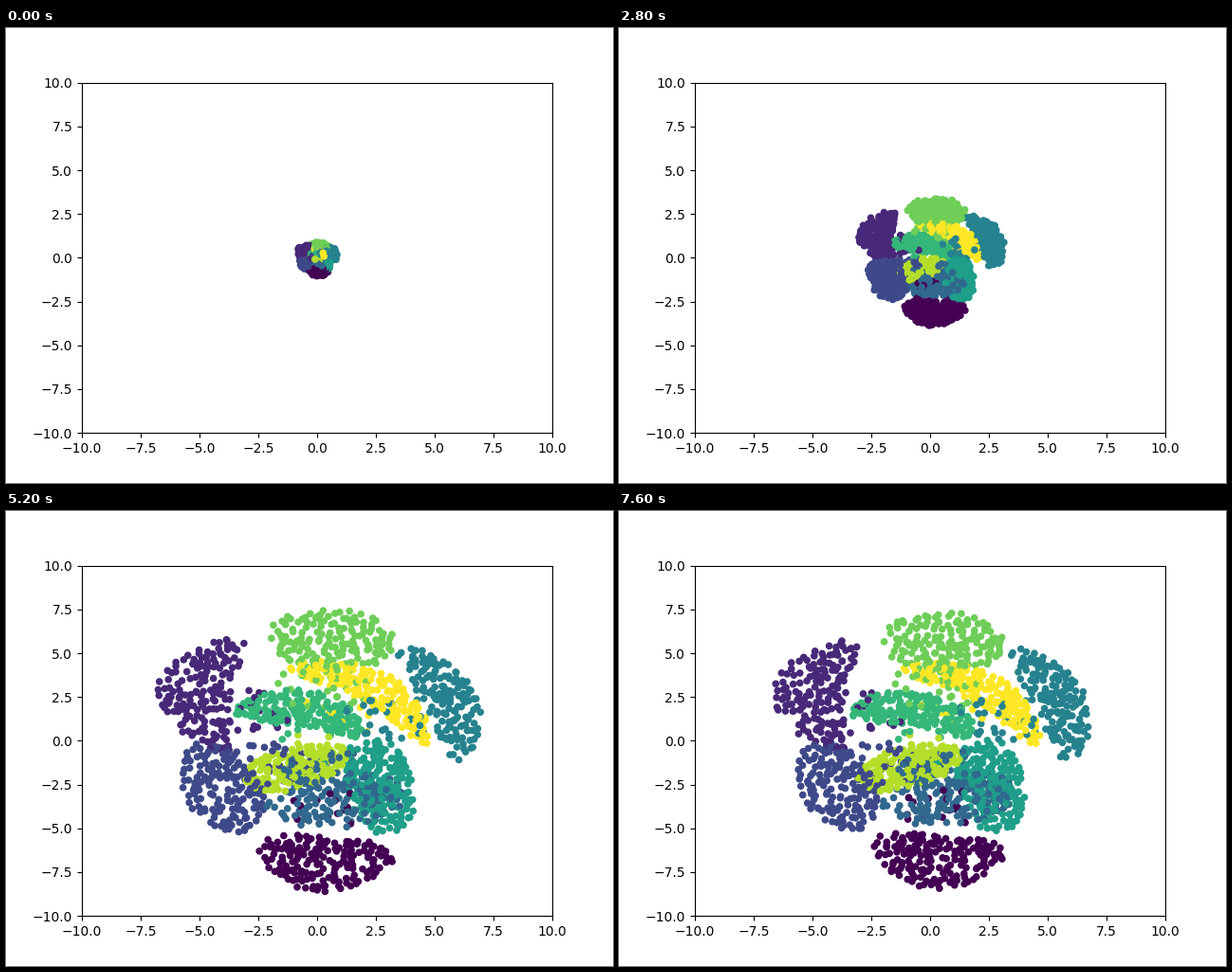
A matplotlib script that plays this animation: 640x480 px, repeating every 8 s.

```python
import numpy as np
import matplotlib.pyplot as plt
from matplotlib.animation import FuncAnimation

FRAMES, INTERVAL = 20, 400
CLASS_SIZE = 180
rng = np.random.default_rng(7)


def disc(count, tries=1):
    """Points in the unit disc; more tries space them more evenly."""
    chosen = np.empty((count, 2))
    for i in range(count):
        angle = rng.uniform(0, 2 * np.pi, tries)
        radius = np.sqrt(rng.uniform(0, 1, tries))
        picks = radius[:, None] * np.column_stack([np.cos(angle), np.sin(angle)])
        gaps = ((picks[:, None] - chosen[None, :i]) ** 2).sum(-1)
        chosen[i] = picks[gaps.min(1, initial=9).argmax()]
    return chosen


def cluster(x, y, length, width, tilt=0, bend=0, strays=0):
    """A bent, tilted ellipse, with some points strayed towards the middle."""
    center = np.array([x, y])
    along, across = disc(CLASS_SIZE - strays, tries=3).T
    across = across * width + bend * along ** 2
    along = along * length
    cos, sin = np.cos(np.radians(tilt)), np.sin(np.radians(tilt))
    body = center + np.column_stack([along * cos - across * sin,
                                     along * sin + across * cos])
    return np.concatenate([body, center * .55 + disc(strays) * [2, 1.3]])


clusters = [
    cluster(.3, -6.9, 2.8, 1.5, tilt=-8, bend=.7, strays=14),
    cluster(-5.1, 2.7, 3.1, 1.5, tilt=85, bend=-1.4, strays=22),
    cluster(-4, -2.6, 2.6, 1.6, tilt=112, strays=38),
    cluster(.8, -3.3, 2.9, 1.5, tilt=8, strays=45),
    cluster(5.5, 2.3, 3.4, 1.1, tilt=-70, bend=-.8, strays=28),
    cluster(2.6, -2.5, 2.7, 1.4, tilt=98, strays=8),
    cluster(-.6, 1.8, 2.8, .95, tilt=-13, bend=-.8, strays=12),
    cluster(.6, 5.6, 2.6, 1.7, tilt=-5, strays=24),
    cluster(-.9, -1.5, 2.3, 1.1, tilt=22, strays=18),
    cluster(2.4, 2.9, 3.6, .85, tilt=-37, bend=-1.2, strays=8),
]
order = rng.permutation(len(clusters) * CLASS_SIZE)
points = np.concatenate(clusters)[order]
labels = np.repeat(np.arange(len(clusters)), CLASS_SIZE)[order]
phase = rng.uniform(0, 2 * np.pi, points.shape)
speed = rng.uniform(.1, .5, points.shape)


def positions(frame):
    """Burst, settle while compressed, then expand and relax."""
    scale = np.interp(frame, [0, 2, 4, 9, 11, 15], [.11, .52, .46, .46, 1.05, 1])
    wobble = .07 + .06 * np.exp(-frame / 3)
    return points * scale + wobble * np.sin(phase + speed * frame)


fig, ax = plt.subplots(figsize=(6.4, 4.8), dpi=100)
ax.set(xlim=(-10, 10), ylim=(-10, 10))
dots = ax.scatter(*positions(0).T, c=labels, s=20, cmap="viridis")


def update(frame):
    dots.set_offsets(positions(frame))
    return (dots,)


animation = FuncAnimation(fig, update, frames=FRAMES, interval=INTERVAL,
                          repeat=True, repeat_delay=0)
plt.show()
```
